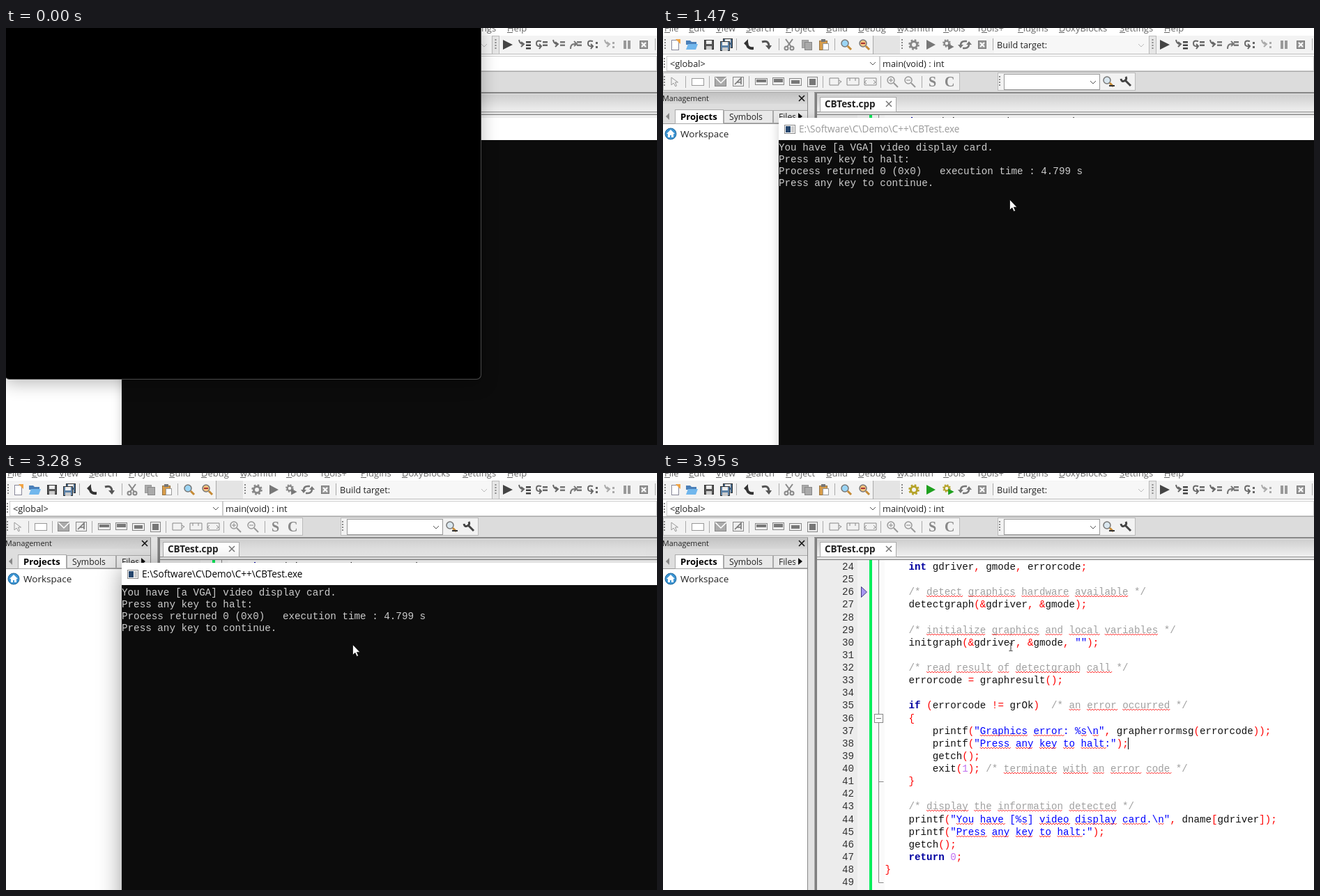
Animation of 934x599 px, one loop 4220 ms. Source, as an HTML page:

```html
<!DOCTYPE html>
<html lang="en">
<head>
<meta charset="utf-8">
<title>Console run in an IDE</title>
<style>
  html, body { margin: 0; width: 100%; height: 100%; overflow: hidden; background: #fff; }
  #stage { position: relative; width: 934px; height: 599px; overflow: hidden; }
  #stage > * { position: absolute; }
  svg { left: 0; top: 0; }
  text { font-family: "Open Sans", "Noto Sans", sans-serif; white-space: pre; }
  .mono { font-family: "Liberation Mono", monospace; }
  .timed, #console, #graph, .title, #pointer { animation: 4220ms step-end infinite; }

  #console {
    left: 166px; top: 129px; width: 800px; height: 500px; background: #0c0c0c;
    box-shadow: 0 2px 14px #0003; animation-name: console;
  }
  #console svg { position: absolute; }
  .title { animation-name: title; fill: #999; }
  #graph {
    left: -2px; top: -10px; width: 683px; height: 514px; background: #000;
    border: solid #4a4a4a; border-width: 0 1px 1px 0; border-radius: 0 0 7px 7px;
    box-shadow: 0 6px 24px #0004; animation-name: graph;
  }
  #caret { animation-name: caret; }
  #click { animation-name: click; }
  #pointer { animation-name: pointer; }
  #beam, #editCaret { visibility: hidden; }
  #beam { animation-name: editor; }
  #editCaret, #ready { animation-name: ready; }
  #busy { animation-name: busy; }

  @keyframes console {
    0% { visibility: visible; box-shadow: 0 2px 14px #0003; }
    76.3% { box-shadow: 0 8px 32px #0006; }
    91.94%, 100% { visibility: hidden; }
  }
  @keyframes title { 0% { fill: #999; } 76.3%, 100% { fill: #000; } }
  @keyframes graph {
    0% { box-shadow: 0 6px 24px #0004; }
    3.08% { box-shadow: 0 8px 32px #0006; visibility: visible; }
    34.83%, 100% { visibility: hidden; }
  }
  @keyframes caret { 0% { visibility: hidden; } 88.86% { visibility: visible; } 91.94%, 100% { visibility: hidden; } }
  @keyframes click {
    0% { visibility: hidden; }
    14.45% { visibility: visible; }
    17.53% { visibility: hidden; }
    76.3% { visibility: visible; }
    77.72%, 100% { visibility: hidden; }
  }
  @keyframes pointer {
    0% { visibility: hidden; transform: translate(314px, 112px); }
    3.08% { visibility: visible; transform: translate(314px, 112px); }
    4.97% { transform: translate(195px, 69px); }
    6.87% { transform: translate(107px, 38px); }
    8.76% { transform: translate(47px, 17px); }
    10.66% { transform: translate(13px, 4px); }
    12.55% { transform: none; visibility: visible; }
    91.94%, 100% { transform: none; visibility: hidden; }
  }
  @keyframes editor { 0% { visibility: hidden; } 91.94%, 100% { visibility: visible; } }
  @keyframes ready { 0% { visibility: hidden; } 93.6%, 100% { visibility: visible; } }
  @keyframes busy { 0% { visibility: visible; } 93.6%, 100% { visibility: hidden; } }
</style>
</head>
<body>
<div id="stage">
  <svg id="ide" width="934" height="599"></svg>
  <div id="console"><svg id="screen" width="768" height="470"></svg></div>
  <div id="graph"></div>
  <svg id="overlay" width="934" height="599">
    <circle id="click" class="timed" cx="497" cy="248" r="13" fill="#ff0" fill-opacity=".5"/>
    <path id="pointer" d="M497.5 246.5v15l3.4-3.2 2.4 5.2 2.3-1-2.3-5.1h4.6z" fill="#fff" stroke="#000" stroke-width=".7"/>
    <path id="beam" class="timed" d="M496.5 244.5h2l.5.5.5-.5h2M499 245v10M496.5 255.5h2l.5-.5.5.5h2" fill="none" stroke="#333"/>
  </svg>
</div>
<script>
const rect = (x, y, w, h, fill, stroke) => stroke
  ? `<rect x="${x + .5}" y="${y + .5}" width="${w - 1}" height="${h - 1}" fill="${fill}" stroke="${stroke}"/>`
  : `<rect x="${x}" y="${y}" width="${w}" height="${h}" fill="${fill}"/>`;
const text = (x, y, s, size, attrs = '') => `<text x="${x}" y="${y}" font-size="${size}" ${attrs}>${
  s.replace(/&/g, '&amp;').replace(/</g, '&lt;')}</text>`;
const fill = (d, color) => `<path d="${d}" fill="${color}"/>`;
const line = (d, color, width = 1) => `<path d="${d}" fill="none" stroke="${color}" stroke-width="${width}"/>`;
const at = (x, y, s) => `<g transform="translate(${x} ${y})">${s}</g>`;
const sep = (x, y) => rect(x, y, 1, 17, '#aaa');
const grip = (x, y) => line(`M${x} ${y}v16`, '#888', 2).replace('/>', ' stroke-dasharray="2 2"/>');
const chevron = (x, y, color = '#555') => line(`M${x - 4} ${y - 2}l4 4 4-4`, color);
const gradient = (id, top, bottom) => `<linearGradient id="${id}" x2="0" y2="1">` +
  `<stop stop-color="${top}"/><stop offset="1" stop-color="${bottom}"/></linearGradient>`;

// Icons are drawn around their own centre.
const floppy = (body, x = 0, y = 0) => at(x, y, rect(-7, -7, 14, 14, body, '#333') +
  rect(-4, -6, 8, 5, '#eee') + rect(-4, 2, 8, 5, '#ccc'));
const lens = color => `<circle cx="-2" cy="-2" r="5" fill="${color}" stroke="#777" stroke-width="1.5"/>` +
  line('M2 2l5 5', '#c58a35', 3);
const zoom = sign => `<circle cx="-2" cy="-2" r="5" fill="none" stroke="#999" stroke-width="1.5"/>` +
  line('M2 2l6 6', '#999', 2) + line(sign, '#888');
const gear = color => `<circle r="4.5" fill="none" stroke="${color}" stroke-width="3"/>` +
  `<circle r="6.5" fill="none" stroke="${color}" stroke-width="2.6" stroke-dasharray="2.6 2.5"/>`;
const play = color => fill('M-6-7L7 0-6 7z', color);
const geared = (a, b) => `<g transform="translate(-2 -2) scale(.75)">${gear(a)}</g>` +
  `<g transform="translate(4 3) scale(.65)">${play(b)}</g>`;
const cross = rect(-6, -6, 12, 12, '#999', '#777') + line('M-3-3l6 6m0-6l-6 6', '#fff', 2);
const dashes = (color, rows = 3) => Array.from({ length: rows }, (_, i) =>
  rect(2, -5 + i * 4.5, 7, 2.5, color)).join('');
const hook = color => line('M-8-7q1 6 6 6M-5-4l4 3-4 4', color, 2);
const round = color => line('M0-5q-7-2-7 3t6 4M-3-1l3 3-3 4', color, 2);

function topToolbar() {
  const icons = [
    [18, rect(-6, -7, 11, 15, '#fff', '#889') + fill('M0-8h7v7z', '#f2a340')],
    [41, fill('M-8-6h6l2 2h7v4H-8z', '#4a7fb8') + fill('M-8 7l3-8H9L6 7z', '#71b7ed')],
    [66, floppy('#555')],
    [91, floppy('#46698b', 2, -2) + floppy('#5e83a8', -2, 2)],
    [123, fill('M-7-2l6-6v4l1 5q2 3 7 2v4q-9 1-11-6z', '#333')],
    [148, line('M-6-4q9-3 10 5', '#555', 3) + fill('M-1 1h9l-4 6z', '#555')],
    [181, line('M-5-8L3 3M5-8L-3 3', '#888', 2) +
      '<g fill="none" stroke="#888" stroke-width="2"><circle cx="-4" cy="5" r="2.5"/><circle cx="4" cy="5" r="2.5"/></g>'],
    [206, rect(-7, -7, 10, 12, '#aaa', '#999') + rect(-3, -4, 11, 12, '#aaa', '#888')],
    [231, rect(-7, -6, 12, 14, '#d79c4a', '#97723f') + rect(-4, -8, 6, 4, '#777') + rect(-2, -2, 9, 10, '#fff', '#999')],
    [263, lens('#9bd5f5')],
    [289, lens('#f1c27e') + line('M-5-2h6', '#a33', 2)],
    [433, line('M-6 1q0-6 6-6h3M6-1q0 6-6 6h-3', '#777', 2.5) + fill('M-10 0h8l-4 5zM10 0h-8l4-5z', '#777')],
    [458, cross],
    [719, fill('M-6-7L8 0-6 7z', '#444')],
    [744, hook('#666') + dashes('#444')],
    [768, round('#666') + dashes('#666', 2)],
    [793, hook('#666') + dashes('#777', 2)],
    [817, line('M-7 6q0-7 5-7h3M-2-5l4 4-4 3', '#777', 2) + dashes('#777', 2)],
    [842, round('#666') + rect(4, -4, 3, 3, '#666') + rect(4, 2, 3, 3, '#666')],
    [867, hook('#aaa') + rect(3, -4, 3, 3, '#aaa') + rect(3, 2, 3, 3, '#aaa')],
    [891, rect(-5, -6, 4, 12, '#999') + rect(1, -6, 4, 12, '#999')],
    [915, cross],
  ];
  const run = (a, b) => at(360, 24, gear(a)) + at(384, 24, play(b)) + at(409, 24, geared(a, b));
  return rect(0, 11, 934, 27, '#f3f3f3') + rect(302, 11, 38, 27, '#e4e4e4') +
    rect(0, 37, 934, 1, '#bbb') + rect(301, 11, 1, 27, '#aaa') + rect(475, 12, 221, 24, '#f7f7f7') +
    rect(697, 11, 11, 27, '#e6e6e6', '#bbb') +
    [105, 166, 246, 473, 931].map(x => sep(x, 15)).join('') + grip(3, 16) + grip(343, 16) + grip(702.5, 16) +
    icons.map(([x, s]) => at(x, 24, s)).join('') +
    `<g id="busy" class="timed">${run('#888', '#777')}</g>` +
    `<g id="ready" class="timed">${run('#b5a329', '#1fa01f')}</g>` +
    text(479, 29, 'Build target:', 12.7, 'fill="#222"') + chevron(686, 25, '#bbb');
}

function drawingToolbar() {
  const box = (x, y, w, h, inner) => rect(x, y, w, h, '#eee', '#888') + inner;
  const icons = [
    [15, line('M-3-6v11l3-3 3 5 1.5-1-2-5h4z', '#999')],
    [50, rect(-9, -5, 18, 11, '#fff', '#999')],
    [82, rect(-8, -7, 17, 14, '#aaa', '#888') + line('M-7-6l8 8 8-8', '#fff', 1.5)],
    [108, box(-8, -7, 16, 14, line('M-5 4L4-5v9M-2 1h6', '#777', 1.6))],
    [141, box(-9, -5, 18, 10, rect(-7, -3, 14, 4, '#777'))],
    [166, box(-9, -6, 17, 11, rect(-7, -4, 13, 5, '#777'))],
    [190, box(-9, -5, 18, 11, rect(-6, -2, 12, 5, '#777'))],
    [214, box(-7, -7, 15, 15, rect(-4, -4, 9, 9, '#777'))],
    [247, line('M-8-5h13v10H-8zM5-2l4 2-4 3', '#888')],
    [272, line('M-8-5H9V5H-8zM-4-5v4M4-5v4', '#888')],
    [297, line('M-8-5H9V5H-8zM-5-2l-3 3 3 2M5-2l3 3-3 2', '#888')],
    [329, zoom('M-5-2h6M-2-5v6')],
    [354, zoom('M-5-2h6')],
    [639, lens('#d9e6ee') + rect(1, 5, 8, 2, '#333')],
    [664, line('M-1-2l8 8', '#444', 3) + line('M-7-4q1 5 5 3t2-6', '#444', 3)],
  ];
  return rect(0, 63, 934, 31, '#dcdcdc') + rect(0, 64, 426, 26, '#f2f2f2', '#bbb') +
    rect(480, 64, 198, 26, '#f2f2f2', '#bbb') + rect(489, 66, 138, 23, '#fff', '#999') + chevron(617, 78) +
    [32, 66, 123, 229, 312, 371].map(x => sep(x, 69)).join('') + grip(2, 69) + grip(483, 69) +
    icons.map(([x, s]) => at(x, 77, s)).join('') +
    ['S', 'C'].map((s, i) => `<text x="${381 + 23 * i}" y="84" font-size="20" font-weight="bold" fill="#888" ` +
      `style="font-family:'Liberation Serif',serif">${s}</text>`).join('');
}

function menuBar() {
  const items = { File: 2, Edit: 37, View: 76, Search: 119, Project: 176, Build: 234, Debug: 280, wxSmith: 336,
    Tools: 402, 'Tools+': 450, Plugins: 509, DoxyBlocks: 568, Settings: 655, Help: 719 };
  return Object.entries(items).map(([name, x]) => text(x, 5, name, 13, 'fill="#666"') +
    rect(name === 'Tools+' ? x + 7 : x, 6, 8, 1, '#666')).join('');
}

function sidePanel() {
  return rect(0, 93, 208, 506, '#fff') + rect(0, 109, 208, 29, '#dedede') + rect(0, 93, 208, 16, 'url(#caption)') +
    text(-1, 105, 'Management', 10.8, 'fill="#222"') + line('M195 97l8 8m0-8l-8 8', '#111', 1.6) +
    rect(17, 117, 70, 21, '#fff', '#aaa') + rect(87, 118, 71, 19, '#e9e9e9', '#aaa') +
    rect(158, 118, 50, 19, '#e9e9e9', '#aaa') + rect(0, 137, 17, 1, '#999') + rect(87, 137, 121, 1, '#999') +
    fill('M9 122v10l-5-5z', '#888') + text(25, 132, 'Projects', 13.1, 'font-weight="bold"') +
    text(95, 132, 'Symbols', 12.2, 'fill="#222"') + text(166, 132, 'Files', 12.2, 'fill="#222"') +
    rect(190, 119, 17, 17, '#e9e9e9') + fill('M194 122v10l6-5z', '#111') +
    '<circle cx="11" cy="152" r="8" fill="#3c94d2" stroke="#236a9d"/>' +
    fill('M11 146l6 6h-2v5h-3v-3h-2v3H7v-5H5z', '#fff') + text(25, 157, 'Workspace', 13.5, 'fill="#222"');
}

const FIRST_LINE = 24, PITCH = 18.13, CHAR = 8.52, CODE_X = 318.5;
const code = String.raw`    int gdriver, gmode, errorcode;

    /* detect graphics hardware available */
    detectgraph(&gdriver, &gmode);

    /* initialize graphics and local variables */
    initgraph(&gdriver, &gmode, "");

    /* read result of detectgraph call */
    errorcode = graphresult();

    if (errorcode != grOk)  /* an error occurred */
    {
        printf("Graphics error: %s\n", grapherrormsg(errorcode));
        printf("Press any key to halt:");
        getch();
        exit(1); /* terminate with an error code */
    }

    /* display the information detected */
    printf("You have [%s] video display card.\n", dname[gdriver]);
    printf("Press any key to halt:");
    getch();
    return 0;
}
`.split('\n');

function tokenStyle(token) {
  if (token.startsWith('/*')) return 'fill="#a0a0a0"';
  if (token[0] === '"') return 'fill="#00f"';
  if (/^(int|if|return)$/.test(token)) return 'fill="#0000a0" font-weight="bold"';
  if (/^\d/.test(token)) return 'fill="#c070f0"';
  return /^\w/.test(token) ? 'fill="#111"' : 'fill="#f00"';
}

function codeLine(source, index) {
  const y = Math.round(139 + index * PITCH);
  const mono = (x, s, style) => text(x, y, s, 14.2, `class="mono" ${style}`);
  let out = mono(257, String(FIRST_LINE + index), 'fill="#333"');
  for (const m of source.matchAll(/\/\*.*?\*\/|"[^"]*"|\w+|[^\w\s]/g)) {
    const x = CODE_X + m.index * CHAR;
    out += mono(x, m[0], tokenStyle(m[0]));
    if (!/^(\/\*|")/.test(m[0])) continue;
    for (const word of m[0].matchAll(/[A-Za-z]+/g)) {
      const waves = Math.round(word[0].length * CHAR / 4);
      out += line(`M${x + word.index * CHAR} ${y + 1}l${'2 2 2-2 '.repeat(waves)}`, '#f22');
    }
  }
  return out;
}

function editor() {
  return rect(208, 94, 726, 31, '#d8d8d8') + rect(208, 93, 10, 506, '#e2e2e2') +
    rect(207, 93, 1, 506, '#888') + rect(217, 93, 1, 506, '#aaa') + rect(218, 93, 3, 506, '#808080') +
    rect(221, 96, 713, 24, 'url(#tabs)') + rect(221, 120, 713, 1, '#999') + rect(221, 121, 713, 3, '#e4e4e4') +
    rect(221, 124, 713, 1, '#777') + rect(225, 99, 110, 22, '#fff', '#aaa') +
    text(232, 114, 'CBTest.cpp', 13.5, 'font-weight="bold" fill="#222"') + line('M320 105l8 8m0-8l-8 8', '#777', 1.5) +
    rect(221, 125, 713, 474, '#fff') + rect(221, 125, 58, 474, '#ececec') + rect(279, 125, 17, 474, '#f3f3f3') +
    rect(296, 125, 4, 474, '#00ee5a') + rect(300, 125, 18, 474, '#fafafa') +
    line('M309.5 125v463.5h7M309.5 443.5h7', '#888') +
    rect(303, 346, 13, 13, '#fff', '#888') + line('M306 352.5h7', '#777') +
    '<path d="M284.5 163.500v15l8-7.5z" fill="#a898f0" stroke="#443a88"/>' +
    code.map(codeLine).join('') +
    '<path id="editCaret" class="timed" d="M667.5 380v17" stroke="#000"/>';
}

document.getElementById('ide').innerHTML =
  `<defs>${gradient('tabs', '#cfcfcf', '#f0f0f0')}${gradient('caption', '#c2c2c2', '#d8d8d8')}</defs>` +
  rect(0, 0, 934, 599, '#fff') + menuBar() + topToolbar() +
  rect(0, 39, 934, 23, '#fff') + rect(5, 40, 306, 22, '#fff', '#ccc') + rect(311, 40, 623, 22, '#fff', '#ccc') + grip(2, 43) +
  text(10, 56, '<global>', 12.8, 'fill="#222"') + chevron(301, 51) +
  text(315, 56, 'main(void) : int', 12.8, 'fill="#222"') + rect(0, 62, 934, 1, '#aaa') +
  drawingToolbar() + rect(0, 92, 208, 1, '#aaa') + rect(217, 92, 717, 2, '#888') + sidePanel() + editor();

const consoleText = [
  'You have [a VGA] video display card.',
  'Press any key to halt:',
  'Process returned 0 (0x0)   execution time : 4.799 s',
  'Press any key to continue.',
];
document.getElementById('screen').innerHTML = rect(0, 0, 768, 32, '#fff') +
  rect(8, 10, 16, 13, '#fff', '#888') + rect(10, 12, 7, 9, '#26466d') + rect(18, 12, 4, 9, '#ccc') +
  text(29, 21, 'E:\\Software\\C\\Demo\\C++\\CBTest.exe', 13.55, 'class="title"') +
  consoleText.map((s, i) => text(0, 47 + i * 17.1, s, 14.25, 'class="mono" fill="#ccc"')).join('') +
  '<rect id="caret" class="timed" x="0" y="113" width="9" height="4" fill="#f2f2f2"/>';
</script>
</body>
</html>
```
